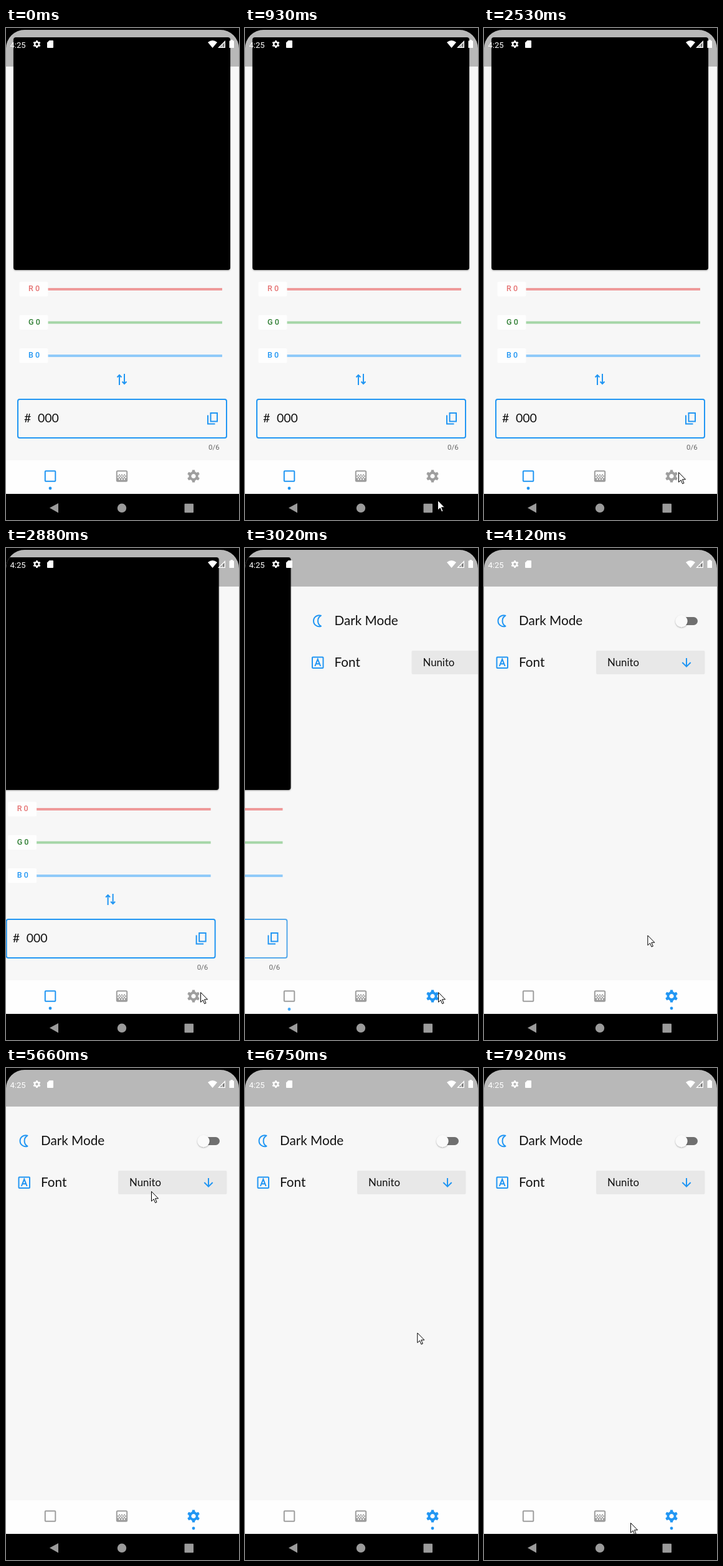
An HTML page that plays this animation: 374x791 px, repeating every 8 s.

```html
<!DOCTYPE html>
<html lang="en">
<head>
<meta charset="utf-8">
<title>Colour picker settings</title>
<style>
  html, body { margin: 0; width: 100%; height: 100%; overflow: hidden; background: #000; }
  svg { display: block; width: 374px; height: 791px; }
  text { white-space: pre; }
  .ui { font-family: Lato, sans-serif; fill: #111; }
  .sys { font-family: Roboto, sans-serif; }
  .line { fill: none; stroke: #2196f3; stroke-width: 2; }
</style>
</head>
<body>
<svg viewBox="0 0 374 791">
  <defs>
    <clipPath id="screen"><path d="M0 749V33A30 30 0 0 1 30 3H344A30 30 0 0 1 374 33V749Z"/></clipPath>
    <filter id="soft" x="-30%" y="-30%" width="160%" height="170%">
      <feDropShadow dx="0" dy="1" stdDeviation="1.1" flood-color="#000" flood-opacity=".35"/>
    </filter>
    <g id="gear"><circle r="5.4" fill="none" stroke="currentColor" stroke-width="3.8"/></g>
  </defs>
  <rect width="374" height="791" fill="#000"/>
  <g clip-path="url(#screen)">
    <rect width="374" height="749" fill="#f7f7f7"/>

    <g id="picker">
      <rect x="12" y="15" width="348" height="374" rx="4" filter="url(#soft)"/>
      <g id="sliders"></g>
      <path class="line" d="M182 574V558M178.5 561.5L182 558L185.500 561.5M190 556V572M186.500 568.5L190 572L193.500 568.5"/>
      <rect x="19" y="597" width="335" height="62" rx="3" fill="none" stroke="#bdbdbd" stroke-width="1"/>
      <rect id="field" class="line" x="19" y="597" width="335" height="62" rx="3"/>
      <text class="ui" x="29" y="634" font-size="19.5">#</text>
      <text class="ui" x="51" y="634" font-size="19.5">000</text>
      <path class="line" d="M328.500 619H339V632.500H328.500ZM324 622.500V636.500H335.500"/>
      <text class="sys" x="325" y="678" font-size="11.5" fill="#666">0/6</text>
    </g>

    <g id="settings">
      <path class="line" d="M34.500 108.700A9 9 0 1 0 34.500 125.700A9.800 9.800 0 0 1 34.500 108.700Z" stroke-linejoin="round"/>
      <text class="ui" x="56" y="124" font-size="20.7">Dark Mode</text>
      <rect x="310" y="111" width="33" height="13" rx="6.500" fill="#6f6f6f"/>
      <circle cx="317" cy="117.500" r="9.700" fill="#fafafa" filter="url(#soft)"/>
      <rect class="line" x="20.500" y="175.500" width="17.500" height="17.500" rx="1"/>
      <path class="line" d="M24.800 190L29.250 178.800L33.700 190M26.300 186.300H32.200" stroke-width="1.8"/>
      <text class="ui" x="56" y="191" font-size="20.7">Font</text>
      <rect x="180" y="165" width="174.500" height="38" rx="2" fill="#e8e8e8"/>
      <text class="ui" x="198" y="189.500" font-size="16.8">Nunito</text>
      <path class="line" d="M325 177V190.500M318.300 184L325 190.700L331.700 184"/>
    </g>

    <rect width="374" height="62" fill="#000" opacity=".255"/>
    <g fill="#fff" color="#fff">
      <text class="sys" x="6.500" y="31.500" font-size="13">4:25</text>
      <use href="#gear" transform="translate(49.500 26) scale(.62)"/>
      <path d="M69.500 20H75Q76 20 76 21V31Q76 32 75 32H67Q66 32 66 31V23.500Z"/>
      <path d="M331.500 32L324 23Q331.500 17 339 23Z"/>
      <path d="M352 20V32H340Z"/>
      <path d="M346.500 27.500V30.600H343.500Z" fill="#777"/>
      <path d="M350.600 23.500V30.600H347.600V26.500Z" fill="#777"/>
      <path d="M360.500 19H364V20.500H366V32H358.500V20.500H360.500Z"/>
    </g>

    <rect y="695" width="374" height="54" fill="#fefefe"/>
    <rect id="tabA" x="62.800" y="712.300" width="16.500" height="16.500" rx="1" fill="none" stroke-width="2"/>
    <g id="shade" transform="translate(186 720.500)" fill="#9e9e9e">
      <rect x="-8.200" y="-8.200" width="16.400" height="16.400" rx="1.500" fill="none" stroke="#9e9e9e" stroke-width="2"/>
      <rect x="-8" y="3" width="16" height="5"/>
    </g>
    <use id="tabB" href="#gear" transform="translate(301 720.500) scale(1.03)"/>
    <circle id="dotA" cx="71" r="2.400" fill="#2196f3"/>
    <circle id="dotB" cx="301" r="2.400" fill="#2196f3"/>
  </g>

  <g fill="#9b9b9b">
    <path d="M70 771.500L84 764V779.500Z"/>
    <circle cx="186" cy="771.800" r="7.200"/>
    <rect x="286.500" y="764.800" width="14.500" height="14.500" rx="1"/>
  </g>
  <path id="cursor" d="M.5 .5V16.200L4.200 12.800L6.600 18.700L9 17.700L6.500 11.800H11.500Z" fill="#fff" stroke="#000" stroke-width="1"/>
</svg>
<script>
const LOOP = 8000, BLUE = '#2196f3', GREY = '#9e9e9e';
const SLIDE = 2857, SLIDE_MS = 350, SWITCH = 2970;
const el = id => document.getElementById(id);
const clamp = v => Math.min(1, Math.max(0, v));
const smooth = k => k * k * (3 - 2 * k);

function add(parent, tag, attrs, label) {
  const node = document.createElementNS('http://www.w3.org/2000/svg', tag);
  for (const k in attrs) node.setAttribute(k, attrs[k]);
  if (label) node.textContent = label;
  parent.append(node);
}

for (let i = 0; i < 6; i++) {
  add(el('gear'), 'path', { d: 'M-2.500 -6L-2 -9.800H2L2.500 -6Z', fill: 'currentColor', transform: `rotate(${i * 60})` });
}

// checker rows of the gradient icon
for (let row = 0; row < 3; row++) {
  for (let x = row % 2 ? -7 : -5; x < 7; x += 4) {
    add(el('shade'), 'rect', { x, y: row * 2 - 3, width: 2, height: 2 });
  }
}
for (const x of [-5, -1, 3]) {
  add(el('shade'), 'rect', { x, y: 4, width: 2, height: 2, fill: '#fefefe' });
}

[['R 0', '#e57373', '#ef9a9a'], ['G 0', '#2e7d32', '#a5d6a7'], ['B 0', '#2196f3', '#90caf9']]
  .forEach(([label, ink, track], i) => {
    const y = i * 53.5, g = el('sliders');
    add(g, 'rect', { x: 66, y: 418 + y, width: 281, height: 4, fill: track });
    add(g, 'rect', { x: 21.5, y: 408 + y, width: 46, height: 23.5, rx: 2, fill: '#fefefe' });
    add(g, 'text', { x: 36, y: 423 + y, class: 'sys', 'font-size': 12.5, 'font-weight': 500, fill: ink }, label);
  });

// cubic-bezier(.25, .1, .25, 1), solved for x by bisection
function ease(x) {
  const curve = (a, b, s) => 3 * a * s * (1 - s) ** 2 + 3 * b * s * s * (1 - s) + s ** 3;
  let lo = 0, hi = 1;
  for (let i = 0; i < 20; i++) {
    const mid = (lo + hi) / 2;
    if (curve(.25, .25, mid) < x) lo = mid; else hi = mid;
  }
  return x <= 0 ? 0 : x >= 1 ? 1 : curve(.1, 1, lo);
}

// spans in which the picture rests: start, end
const RESTS = [[930, 1030], [1150, 1300], [2070, 2170], [2530, 2630], [2880, 2980],
  [3020, 3120], [3770, 3870], [4640, 4740]];

// pointer path: time, x, y
const PATH = [[500, 289, 789], [730, 289, 789], [930, 309, 759], [1150, 312, 756],
  [1300, 313, 754], [2070, 315, 728], [2170, 315, 728], [2530, 312, 714], [2880, 312, 714],
  [3020, 310, 714], [3770, 304, 729], [3870, 304, 728], [4640, 137, 305], [4740, 137, 305],
  [5540, 231, 199], [5660, 233, 198], [6410, 233, 198], [7210, 344, 781], [7230, 345, 787],
  [7680, 211, 732], [7920, 235, 731], [8000, 235, 731]];

function pointer(t) {
  if (t < 500 || (t >= 7230 && t < 7680)) return null;
  const i = PATH.findIndex((p, n) => n && t < p[0]);
  const [t0, x0, y0] = PATH[i - 1], [t1, x1, y1] = PATH[i];
  const k = smooth((t - t0) / (t1 - t0));
  return [x0 + (x1 - x0) * k, y0 + (y1 - y0) * k];
}

function dot(id, shown) {
  el(id).setAttribute('cy', 740 + 9 * (1 - shown));
  el(id).setAttribute('opacity', shown);
}

function draw(time) {
  const rest = RESTS.find(([a, b]) => time >= a && time < b);
  const t = rest ? rest[0] : time;

  const p = ease(clamp((t - SLIDE) / SLIDE_MS));
  el('picker').setAttribute('transform', `translate(${-374 * p} 0)`);
  el('settings').setAttribute('transform', `translate(${374 * (1 - p)} 0)`);
  el('field').setAttribute('opacity', 1 - clamp((t - SWITCH) / 170));

  const switched = t >= SWITCH;
  el('tabA').setAttribute('stroke', switched ? GREY : BLUE);
  el('tabB').setAttribute('color', switched ? BLUE : GREY);
  dot('dotA', 1 - clamp((t - SWITCH) / 300));
  dot('dotB', smooth(clamp((t - 3130) / 270)));

  const at = pointer(t);
  el('cursor').setAttribute('visibility', at ? 'visible' : 'hidden');
  if (at) el('cursor').setAttribute('transform', `translate(${at[0]} ${at[1]})`);
}

const start = performance.now();
function tick() {
  draw((performance.now() - start) % LOOP);
  requestAnimationFrame(tick);
}
tick();
</script>
</body>
</html>
```
